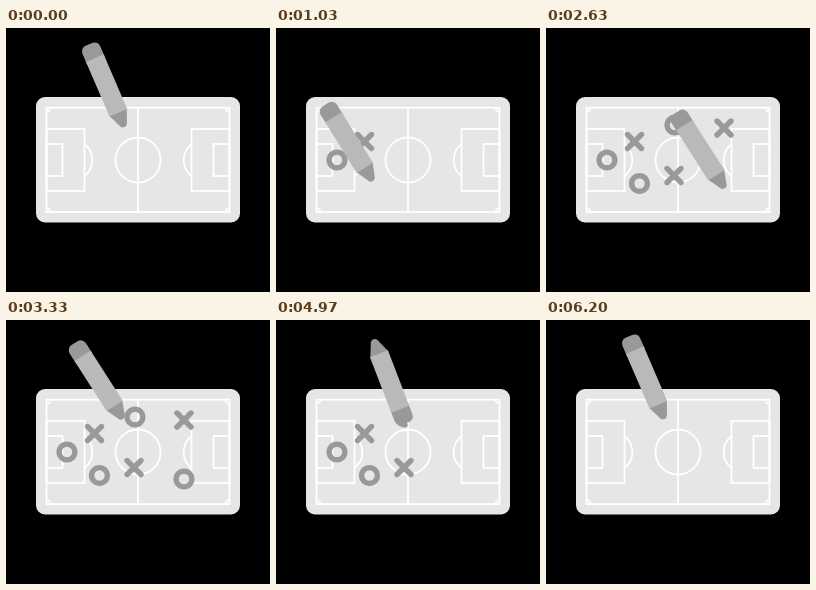
Recreate the animation shown at these times as an HTML page with a canvas. Size 264 px wide and 264 px high, loop 7.01 s.

```html
<!DOCTYPE html>
<html lang="en">
<head>
<meta charset="utf-8">
<title>Tactics board</title>
<style>
html, body { margin: 0; width: 100%; height: 100%; overflow: hidden; background: #000; }
canvas { display: block; width: 100vw; height: 100vh; }
</style>
</head>
<body>
<canvas></canvas>
<script>
const canvas = document.querySelector('canvas');
const ctx = canvas.getContext('2d');
const LOOP = 7010, HALF = 45, ARM = 7, RING = 7.9;
const DARK = '#999', BODY = '#b9b9b9', BOARD = '#e6e6e6';

// Marks in drawing order: shape, centre, pencil angle, draw start/end, erase start/end
const marks = [
  ['o', 61, 132, 32, 260, 520, 5750, 5880],
  ['x', 88.5, 113.5, 31, 690, 920, 5570, 5690],
  ['o', 93.5, 155.5, 31, 1090, 1340, 5270, 5420],
  ['x', 128, 147.5, 29, 1510, 1760, 5060, 5200],
  ['o', 129, 97, 20.7, 1880, 2120, 4860, 5000],
  ['x', 178, 100, 30, 2260, 2520, 4670, 4810],
  ['o', 178, 159, 33, 2660, 2920, 4480, 4610]
].map(([type, x, y, a, on, drawn, wipe, gone]) => ({ type, x, y, a, on, drawn, wipe, gone }));

// Pencil poses are stored by the pencil's middle, so that it flips in place
const keys = [];
function pose(t, x, y, a, ease, end) {
  const r = a * Math.PI / 180, s = end === 'eraser' ? 1 : -1;
  keys.push({ t, x: x + s * HALF * Math.sin(r), y: y + s * HALF * Math.cos(r), a, ease });
}

function drawKeys(m) {
  const at = (p, dx, dy, ease) =>
    pose(m.on + p * (m.drawn - m.on), m.x + dx, m.y + dy, m.a, ease);
  if (m.type === 'x') {
    at(0, ARM, -ARM, true);
    at(0.4, -ARM, ARM);
    at(0.6, -ARM, -ARM);
    at(1, ARM, ARM);
  } else {
    for (let i = 0; i <= 12; i++) {
      const r = Math.PI / 2 + i * Math.PI / 6;
      at(i / 12, RING * Math.cos(r), RING * Math.sin(r), i === 0);
    }
  }
}

function wipeKeys(m, a) {
  const at = (p, dx, dy) =>
    pose(m.wipe + p * (m.gone - m.wipe), m.x + dx, m.y + dy, a, true, 'eraser');
  at(0, 5, -1);
  at(0.5, -5, 5);
  at(1, 4, 7);
}

pose(0, 118.5, 99, 23.3);
marks.forEach((m, i) => {
  if (i === 2) pose(1030, 97, 153, 31.8);
  drawKeys(m);
});
pose(3330, 117, 99, 32.6, true);
pose(4130, 117, 99, 32.6);
pose(4430, 127, 72, 200, true);
for (let i = 6; i >= 0; i--) {
  if (i === 1) pose(5500, 51, 72, 201.7, true);
  wipeKeys(marks[i], i ? 201 : 208);
}
pose(6200, 118.5, 99, 23.3, true);
pose(LOOP, 118.5, 99, 23.3);

const clamp = v => Math.max(0, Math.min(1, v));
const smooth = p => p * p * (3 - 2 * p);

function pencilAt(t) {
  const i = Math.max(1, keys.findIndex(k => k.t > t));
  const a = keys[i - 1], b = keys[i];
  let p = clamp((t - a.t) / (b.t - a.t));
  if (b.ease) p = smooth(p);
  const mix = n => a[n] + (b[n] - a[n]) * p;
  return { x: mix('x'), y: mix('y'), a: mix('a') };
}

function line(x1, y1, x2, y2) {
  ctx.beginPath();
  ctx.moveTo(x1, y1);
  ctx.lineTo(x2, y2);
  ctx.stroke();
}

function arc(x, y, r, from, to) {
  ctx.beginPath();
  ctx.arc(x, y, r, from, to);
  ctx.stroke();
}

function drawBoard() {
  ctx.fillStyle = BOARD;
  ctx.beginPath();
  ctx.roundRect(30, 69, 204, 125.5, 9);
  ctx.fill();
  ctx.strokeStyle = '#fff';
  ctx.lineWidth = 1.8;
  ctx.lineCap = 'butt';
  ctx.strokeRect(40.5, 79.7, 183, 104.4);
  line(132, 79.7, 132, 184.1);
  arc(132, 132, 22.5, 0, Math.PI * 2);
  for (const side of [1, -1]) {
    ctx.save();
    ctx.translate(132, 132);
    ctx.scale(side, 1);
    ctx.strokeRect(-91.5, -31, 38, 62);
    ctx.strokeRect(-91.5, -16, 16, 32);
    arc(-66, 0, 20.3, -0.907, 0.907);
    arc(-91.5, -52.3, 4, 0, Math.PI / 2);
    arc(-91.5, 52.1, 4, -Math.PI / 2, 0);
    ctx.restore();
  }
}

function drawMark(m, t) {
  const p = t < m.wipe
    ? clamp((t - m.on) / (m.drawn - m.on))
    : 1 - clamp((t - m.wipe) / (m.gone - m.wipe));
  if (!p) return;
  ctx.strokeStyle = DARK;
  ctx.lineWidth = 5.4;
  ctx.lineCap = 'round';
  if (m.type === 'o') {
    arc(m.x, m.y, RING, Math.PI / 2, Math.PI * (0.5 + 2 * p));
    return;
  }
  const stroke = (q, dir) => {
    if (q <= 0) return;
    const d = ARM * (2 * clamp(q) - 1);
    line(m.x - dir * ARM, m.y - ARM, m.x + dir * d, m.y + d);
  };
  stroke(p / 0.4, -1);
  stroke((p - 0.6) / 0.4, 1);
}

function drawPencil({ x, y, a }) {
  ctx.save();
  ctx.translate(x, y);
  ctx.rotate(-a * Math.PI / 180);
  ctx.translate(0, HALF);
  ctx.fillStyle = DARK;
  ctx.beginPath();
  ctx.roundRect(-9.6, -90, 19.2, 18, [6, 6, 0, 0]);
  ctx.fill();
  ctx.beginPath();
  ctx.moveTo(-9.6, -16.5);
  ctx.lineTo(-3.6, -2.2);
  ctx.quadraticCurveTo(-2.6, 0, 0, 0);
  ctx.quadraticCurveTo(2.6, 0, 3.6, -2.2);
  ctx.lineTo(9.6, -16.5);
  ctx.fill();
  ctx.fillStyle = BODY;
  ctx.fillRect(-9.6, -75, 19.2, 59.5);
  ctx.restore();
}

function resize() {
  const ratio = window.devicePixelRatio || 1;
  canvas.width = Math.round(innerWidth * ratio);
  canvas.height = Math.round(innerHeight * ratio);
}

function render() {
  const t = performance.now() % LOOP;
  ctx.setTransform(canvas.width / 264, 0, 0, canvas.height / 264, 0, 0);
  ctx.fillStyle = '#000';
  ctx.fillRect(0, 0, 264, 264);
  drawBoard();
  marks.forEach(m => drawMark(m, t));
  drawPencil(pencilAt(t));
  requestAnimationFrame(render);
}

addEventListener('resize', resize);
resize();
render();
</script>
</body>
</html>
```
